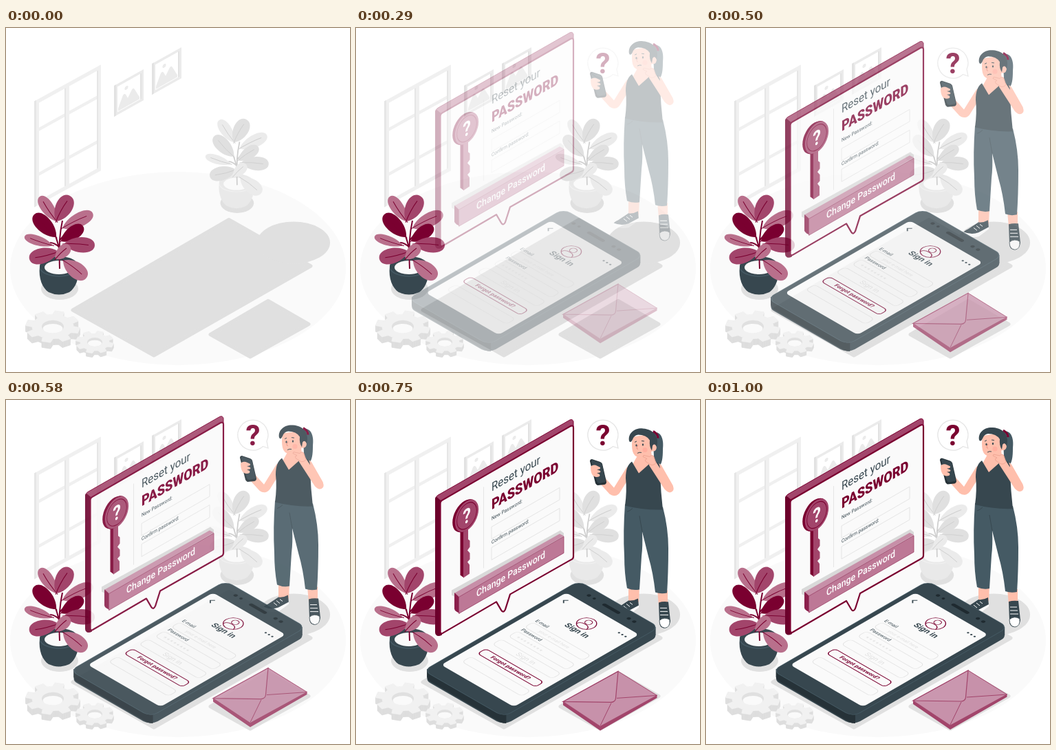
An HTML page for the animation above (1040 ms loop, 500 by 500 pixels).

```html
<!DOCTYPE html>
<html lang="en">
<head>
<meta charset="utf-8">
<title>Reset password</title>
<style>
  html, body { margin: 0; height: 100%; overflow: hidden; background: #fff }
  svg { display: block; width: 100vw; height: 100vh; font-family: Roboto, Inter, sans-serif }
  .dark { fill: #7a0030 } .mid { fill: #a2456b } .light { fill: #b9708c }
  .ink { fill: #37474f } .slate { fill: #455a64 } .skin { fill: #ffbfac }
  .grey { fill: #e0e0e0 } .pale { fill: #ebebeb } .white { fill: #fff }
  .line { fill: none; stroke: #7a0030 }
  .rule { fill: none; stroke: #e3e3e3; stroke-width: .9 }
  .arm { fill: none; stroke: #ffbfac; stroke-linecap: round; stroke-linejoin: round }
  .vein { fill: none; stroke: #7a0030; stroke-width: 1 }
  .stem { stroke-width: 2 }
  #greyPlant .dark, #greyPlant .mid { fill: #e0e0e0 }
  #greyPlant .light { fill: #ebebeb }
  #greyPlant .vein { stroke: #cfcfcf }
  #greyPlant .ink { fill: #e9e9e9 }
  #greyPlant .slate { fill: #f0f0f0 }
</style>
</head>
<body>
<svg viewBox="0 0 500 500">
  <ellipse cx="250" cy="349.500" rx="244" ry="140.500" fill="#fafafa"/>

  <!-- window -->
  <g transform="matrix(1 -.55 0 1 41 106.500)">
    <path fill="#f0f0f0" fill-rule="evenodd" d="M0 0H97V154H0ZM7 6V42H44V6ZM51 6V42H91V6ZM7 47V107H44V47ZM51 47V107H91V47ZM7 112V148H44V112ZM51 112V148H91V112Z"/>
    <path fill="#e6e6e6" d="M0 0H3V154H0ZM44 6H46V148H44ZM91 6H93V148H91Z"/>
  </g>

  <!-- framed pictures -->
  <g id="picture" transform="matrix(1 -.56 0 1 157 84)">
    <path class="pale" d="M0 0H43V45H0Z"/>
    <path fill="#e2e2e2" d="M0 0H3V45H0ZM38 4H40V41H38Z"/>
    <path class="white" d="M5 4H38V41H5Z"/>
    <path class="pale" d="M6 36L13 21Q15 19 17 22L20 29L26 20Q28 18 30 22L37 37V40H6Z"/>
    <circle class="pale" cx="18" cy="13" r="2.600"/>
  </g>
  <use href="#picture" x="55" y="-32"/>

  <!-- shadows -->
  <g class="grey" stroke="#e0e0e0" stroke-width="5" stroke-linejoin="round">
    <path d="M97 410L324 278.500L443 346L215 476Z"/>
    <path d="M297 445.500L381 396.500L440 430.500L355 478Z"/>
  </g>
  <ellipse class="grey" cx="418" cy="312" rx="53" ry="30.500"/>

  <g id="gears"></g>
  <g id="greyPlant" transform="matrix(.9 0 0 .9 265.700 -86.600)"></g>
  <g id="plant"></g>

  <!-- dialog -->
  <g id="dialog">
    <path class="mid" stroke="#7a0030" stroke-width="1" d="M115.500 143Q115.500 139 119 137L311 27.500Q315 26 316 30V40L123 150Z"/>
    <path fill="#6c002b" d="M115 142Q116 138 119 141L125 146V340Q119 343 116.500 340Q115 339 115 336Z"/>
    <path fill="#fafafa" stroke="#7a0030" stroke-width="2.200" stroke-linejoin="round" d="M122.500 149Q122.500 146 125 144.500L312 36.500Q316 35 316 39V226Q316 229 313 230.500L224 281L217 303Q214 309 211 304L204 292L126 337.500Q122.500 339 122.500 335Z"/>
    <path class="rule" d="M185.500 125V243M197 183L296 126V143.500L197 200.500ZM197 213L296 156V174L197 231Z"/>
    <g id="key">
      <path class="dark" d="M151.500 186V253L157 257V186Z"/>
      <path class="mid" d="M156 186V257L165 251V238L162 234L165.500 230V221L162 217L165.500 212V203L163 201V186Z"/>
      <g transform="matrix(.866 -.5 0 1.080 161 167)">
        <circle class="dark" cx="-4" cy="-2" r="20"/>
        <circle class="dark" cx="-2" cy="-1" r="20.300"/>
        <circle class="mid" r="19.800"/>
        <circle r="16.500" class="line" stroke-width="1"/>
        <text class="white" y="9.500" font-size="27" font-weight="700" text-anchor="middle">?</text>
      </g>
    </g>
    <path fill="#d9d9d9" d="M139 275L297 188L302 192V198L148 287L139 282Z"/>
    <path fill="#8b1f4b" d="M143 280Q143 278 146 279L151 283V309L146 306Q143 304 143 302Z"/>
    <path fill="#c78fa8" d="M143.500 279L296 193L302 196L150 285Z"/>
    <path fill="#bd7896" stroke="#9b3f66" stroke-width=".8" d="M149.500 285L302 197V221L149.500 309Z"/>
    <g class="ink">
      <text transform="matrix(.866 -.5 0 1 197 131.500)" font-size="17.400">Reset your</text>
      <text class="dark" transform="matrix(.866 -.5 0 1 197 158)" font-size="21" font-weight="900">PASSWORD</text>
      <text transform="matrix(.866 -.5 0 1 197 173.500)" font-size="7.500">New Password:</text>
      <text transform="matrix(.866 -.5 0 1 197 208)" font-size="7.500">Confirm password:</text>
      <text class="white" transform="matrix(.866 -.5 0 1 175 285)" font-size="14.300" font-weight="500">Change Password</text>
    </g>
  </g>

  <!-- question balloon -->
  <g id="balloon">
    <path class="white" stroke="#e4e4e4" stroke-width="1.300" d="M381 70L373.500 67.500A22 22 0 1 1 379 60Z"/>
    <text class="dark" x="359" y="66" font-size="42" font-weight="700" text-anchor="middle">?</text>
  </g>

  <!-- woman -->
  <g id="woman">
    <path class="slate" d="M430 46C443 42 448 55 446 70C446 83 445 92 439 97C431 92 434 79 432 68Z"/>
    <path class="arm" stroke-width="11" d="M397 101L379 130Q376 134 372 131L353 110"/>
    <path class="skin" d="M396 270H412L411 292L396 294ZM438 275H453L453 297H440Z"/>
    <path class="skin" d="M411 76L429 72L431 92L411 107L402 92Z"/>
    <path class="ink" d="M396 290Q403 291 410 287L411 299Q403 304 396 310Q385 313 374 306Q374 303 381 300Z"/>
    <path class="white" d="M374 304Q386 309 396 305L411 297V300L397 310.500Q385 314 374 307Z"/>
    <path class="ink" d="M440 293Q446 291 454 292L457 320Q455 330 447 330Q441 329 441 321Z"/>
    <path class="white" stroke="#37474f" stroke-width=".8" d="M441 319Q448 313 456 318Q457 329 449 330Q441 329 441 319Z"/>
    <path d="M389 298L394 302M393 295L398 299M398 293L402 296M442 301H452M442 306H453M442 311H454" stroke="#fff" stroke-width="1"/>
    <path class="slate" d="M391 150L446 154Q454 185 454 214Q454 250 452 279Q443 281 435 278Q432 250 425 226L416 190Q417 210 415 226L412 274Q403 276 394 272Q390 250 390 225Q388 190 391 150Z"/>
    <path d="M416 190L412 167M402 156Q398 160 394 161" fill="none" stroke="#37474f" stroke-width=".9"/>
    <path class="arm" stroke-width="12" d="M439 97L455 125"/>
    <path class="ink" d="M401 88L411 105L429 89L438 89Q443 92 442 106Q443 132 446 158Q418 159 391 152Q394 131 392 112Q392 94 401 88Z"/>
    <path class="arm" stroke-width="11" d="M442 103L455 125Q458 130 453 125L431 91"/>
    <path class="skin" d="M402 52Q400 64 402 73Q405 83 414 81Q424 80 430 73Q437 74 437 66Q435 61 431 64L428 48Z"/>
    <path class="ink" d="M397 58C395 47 405 39 417 40C434 41 441 54 437 67Q434 60 431 65L430 72Q426 66 427 57Q422 49 410 49Q404 50 402 56Q399 62 397 58Z"/>
    <path d="M432 44Q439 48 439 54" class="line" stroke-width="3"/>
    <g fill="none" stroke="#37474f" stroke-width="1">
      <path d="M405 60L408 58.500M415 58L419 58.500M409 76Q412 74 415 75"/>
      <path d="M410 64Q406 70 410 70" stroke="#e58f80"/>
    </g>
    <ellipse class="ink" cx="407.500" cy="64.500" rx="1.100" ry="1.700"/>
    <ellipse class="ink" cx="417" cy="63.500" rx="1.100" ry="1.700"/>
    <circle cx="420" cy="71" r="3.500" fill="#ff9f94" opacity=".5"/>
    <path class="skin" stroke="#e99c8c" stroke-width=".7" d="M418 79L427 81Q431 77 433 81L436 90Q432 95 427 92L421 88Q419 85 423 84L417 81Z"/>
    <g transform="translate(0 -1.500)">
      <path fill="#263238" d="M340 89Q340 86 343 86L355 90Q357 91 358 93L364 119Q364 122 361 123L351 124Q349 123 348 121Z"/>
      <path class="ink" d="M343 87L355 91Q357 92 358 95L363 119L354 121Q351 121 350 118L342 90Z"/>
      <path class="skin" d="M341 97Q345 93 351 96L355 98Q356 101 350 101L355 103Q357 106 350 106L354 108Q356 112 349 112Q341 111 341 97Z"/>
    </g>
  </g>

  <!-- phone -->
  <g id="phone">
    <g class="ink">
      <rect transform="matrix(.866 .5 -.866 .5 306 294)" x="-10" y="-29" width="135.700" height="261.500" rx="12"/>
      <path d="M101.800 391L434.200 330V342L101.800 403Z"/>
    </g>
    <path fill="#263238" d="M101.800 391L106 397L207 455.500Q212 458 217 458V470Q212 470 207 467.500L106 409Q102 406 101.800 403Z"/>
    <g transform="matrix(.866 .5 -.866 .5 306 282)">
      <rect class="slate" x="-10" y="-29" width="135.700" height="261.500" rx="12"/>
      <rect class="ink" x="-9" y="-28" width="133.700" height="259.500" rx="11"/>
      <rect x="-3" y="-1" width="122" height="210" rx="6" fill="#fafafa"/>
      <g fill="#1f2a30">
        <rect x="44" y="-18" width="28" height="5" rx="2.500"/>
        <circle cx="20" cy="-16" r="2.500"/><circle cx="29" cy="-16" r="2"/>
        <circle cx="87" cy="-16" r="2.500"/><circle cx="96" cy="-16" r="2.500"/>
      </g>
      <path d="M10 8.500L6 12.500L10 16.500" fill="none" stroke="#37474f" stroke-width="1.500"/>
      <g class="ink"><circle cx="99.500" cy="13" r="1.400"/><circle cx="105" cy="13" r="1.400"/><circle cx="110.500" cy="13" r="1.400"/></g>
      <g class="line" stroke-width="1.100">
        <circle cx="59" cy="27" r="12"/><circle cx="59" cy="23.500" r="4.500"/>
        <path d="M50.500 35.500Q51 29 59 29T67.500 35.500"/>
        <rect x="11" y="148" width="97" height="14" rx="5" stroke-width="1.300"/>
      </g>
      <g class="rule">
        <rect x="12" y="70" width="97" height="14" rx="5"/>
        <rect x="12" y="96" width="97" height="15" rx="5"/>
        <rect x="10" y="121" width="100" height="15" rx="5"/>
        <rect x="10" y="172" width="100" height="15" rx="5"/>
      </g>
      <g class="ink" font-size="7.400">
        <text x="61" y="49" font-size="12" font-weight="700" text-anchor="middle">Sign in</text>
        <text x="12" y="67">E-mail</text>
        <text x="13" y="92">Password</text>
        <text class="grey" x="30" y="79.500" font-size="7">your e-mail here</text>
        <text class="grey" x="20" y="108.500" font-size="9" letter-spacing="1.500">********</text>
        <text class="grey" x="59" y="132" font-size="10" text-anchor="middle">Sign in</text>
        <text class="dark" x="59.500" y="157.500" font-size="8" font-weight="700" text-anchor="middle">Forgot password?</text>
      </g>
    </g>
  </g>

  <!-- envelope -->
  <g id="envelope">
    <path class="mid" d="M301 437L355 472L437.500 427V431.500L355 479L301 442Z"/>
    <path fill="#c791aa" stroke="#a2456b" stroke-width="1" stroke-linejoin="round" d="M301 437L381 393L437.500 428L355 473Z"/>
    <path d="M355 472L371 439M437 428L379 432" fill="none" stroke="#a2456b"/>
    <path fill="#ca97af" stroke="#a2456b" stroke-width="1.200" d="M301 437L370 438Q377 438 377.500 432L381 393Z"/>
  </g>
</svg>
<script>
const $ = id => document.getElementById(id);

// Leaf: base, tip, half width, tone
const leaves = [
  [74, 281, 49, 245, 9, 'light'], [73, 281, 93, 244, 12, 'mid'],
  [82, 291, 126, 269, 10, 'light'], [73, 304, 41, 271, 11, 'dark'],
  [80, 310, 112, 288, 9.5, 'dark'], [84, 314, 129, 316, 11, 'mid'],
  [68, 316, 27, 303, 7, 'light'], [76, 325, 34, 336, 11, 'mid'],
  [72, 336, 92, 316, 8.5, 'light'], [83, 338, 117, 363, 11.5, 'light']
];

function leaf([x, y, tx, ty, w, tone]) {
  const l = Math.hypot(tx - x, ty - y), a = Math.atan2(ty - y, tx - x) * 180 / Math.PI;
  const k = w * 1.36;
  return `<g transform="translate(${x} ${y}) rotate(${a})">
    <path class="${tone}" d="M0 0C${l * .28} ${-k} ${l} ${-k} ${l} 0C${l} ${k} ${l * .28} ${k} 0 0"/>
    <path class="vein" d="M-2 0Q${l * .4} ${-w * .2} ${l * .8} 0"/></g>`;
}

const plant = `<ellipse class="grey" cx="78" cy="379" rx="27" ry="16"/>
  <path class="ink" d="M49 347C49 327 105 327 105 347C107 364 101 378 92 384Q77 391 62 384C53 378 47 364 49 347"/>
  <path class="slate" d="M49 346A28 14 0 0 0 105 346L104.500 351A28 13 0 0 1 49.500 351Z"/>
  <ellipse cx="77" cy="348" rx="21" ry="10" fill="#fafafa"/>
  <path class="vein stem" d="M78 350Q77 330 78 308Q79 294 82 280M77 320Q74 305 66 288M78 309Q84 300 92 294M77 318Q70 312 64 312"/>`
  + leaves.map(leaf).join('');
$('plant').innerHTML = $('greyPlant').innerHTML = plant;

function gear(cx, cy, r, depth, turn) {
  const teeth = 8, ring = [];
  for (let i = 0; i < teeth; i++)
    for (const [o, k] of [[-.31, .76], [-.2, 1], [.2, 1], [.31, .76]]) {
      const a = (i + o) / teeth * 2 * Math.PI + turn;
      ring.push(`${cx + r * k * Math.cos(a)} ${cy + r * k * .577 * Math.sin(a)}`);
    }
  const d = `M${ring.join('L')}Z`, h = r * .41;
  const style = 'stroke-width="2" stroke-linejoin="round"';
  let out = '';
  for (let i = depth; i > 0; i--)
    out += `<path d="${d}" transform="translate(0 ${i})" fill="#dedede" stroke="#dedede" ${style}/>`;
  return out + `<path d="${d}" fill="#f1f1f1" stroke="#f1f1f1" ${style}/>
    <ellipse cx="${cx}" cy="${cy}" rx="${h}" ry="${h * .58}" class="grey"/>
    <ellipse cx="${cx}" cy="${cy + depth * .3}" rx="${h * .9}" ry="${h * .42}" fill="#fafafa"/>`;
}
$('gears').innerHTML = gear(68, 434, 39, 9, .25) + gear(129, 456.5, 27, 6, .3);

// Slide easing: cubic-bezier(.36, -.01, .5, 1.38)
const curve = (s, a, b) => 3 * (1 - s) ** 2 * s * a + 3 * (1 - s) * s * s * b + s ** 3;
function ease(t) {
  let lo = 0, hi = 1;
  for (let i = 0; i < 30; i++) {
    const s = (lo + hi) / 2;
    if (curve(s, .36, .5) < t) lo = s; else hi = s;
  }
  return curve(hi, -.01, 1.38);
}

const slides = { dialog: [0, -30], woman: [0, -30], envelope: [0, -30], phone: [-30, 0], balloon: [0, 0] };

function draw(now) {
  const step = Math.floor((now % 1040 + 5) * 24 / 1000); // 24 poses a second
  const e = step ? ease(Math.min(1, step / 24)) : 0;
  for (const [id, [x, y]] of Object.entries(slides)) {
    $(id).setAttribute('transform', `translate(${x * (1 - e)} ${y * (1 - e)})`);
    $(id).setAttribute('opacity', Math.max(0, Math.min(1, e)));
  }
  requestAnimationFrame(draw);
}
draw(performance.now());
</script>
</body>
</html>
```
